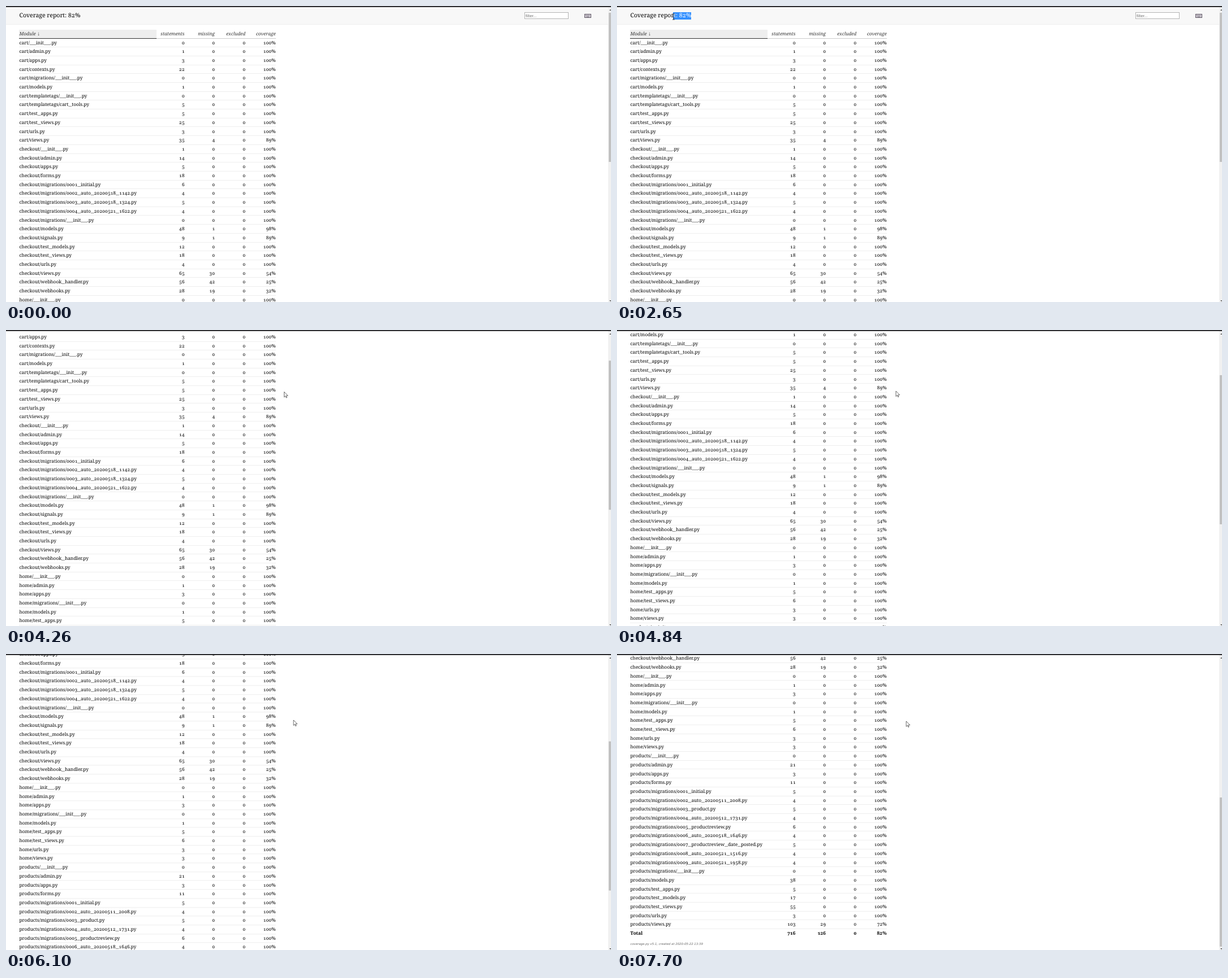
Recreate the animation shown at these times as an HTML page. Size 1069x524 px, loop 8000 ms.

```html
<!DOCTYPE html>
<html lang="en">
<head>
<meta charset="utf-8">
<title>Coverage report</title>
<style>
html, body { margin: 0; width: 100%; height: 100%; overflow: hidden; background: #fff; }
body { position: relative; color: #000; text-rendering: geometricPrecision; font: 8.33px "Noto Serif", serif; font-variant-numeric: oldstyle-nums tabular-nums; }
#page, #head, #title, #pick, #filter, #keys, #foot, #bar, #track, #thumb, #cursor, .row, .arrow { position: absolute; }
#page { left: 0; top: 0; width: 1064px; height: 1006px; }
#head { left: 0; top: 0; width: 1064px; height: 32px; background: #f8f8f8; border-bottom: 1px solid #eee; }
#title, #pick { left: 23.5px; top: 11px; height: 13px; font-size: 10.5px; line-height: 13px; white-space: pre; }
#pick { color: #fff; background: #3390ff; }
#filter { left: 916px; top: 11px; width: 76px; height: 10px; border: 1px solid #b4b4b4; background: #fff; font: 7.4px/11px "Liberation Sans", sans-serif; color: #757575; text-indent: 1px; }
#keys { left: 1022px; top: 14px; }
.row { left: 23px; width: 454px; height: 15.7px; line-height: 15.7px; box-sizing: border-box; border-bottom: 1px solid #eee; display: grid; grid-template-columns: 243px 49.5px 53.5px 54px 53.5px; white-space: pre; }
.row span { text-align: right; height: 15px; }
.row span:first-child { text-align: left; padding-left: .5px; }
.row i { font: 9.65px/0 "Liberation Mono", monospace; }
.row.hover { background: #eee; }
.row.hover span:first-child { text-decoration: underline; }
.row.top { top: 42px; height: 16px; font-style: italic; color: #333; border-bottom-color: #ccc; }
.row.top span:first-child { background: #eee; border-bottom: 1px solid #333; }
.row.total { font-weight: bold; border: 0; }
#foot { left: 23.5px; top: 990px; font: italic 5.4px/11px "DejaVu Sans", sans-serif; color: #666; white-space: pre; }
#bar { left: 0; top: 0; width: 100%; height: 2px; background: #2d2d30; }
#track { left: 1064px; top: 2px; width: 5px; height: 522px; background: #f1f1f1; }
#thumb { left: 1064.5px; top: 12px; width: 4.5px; height: 264px; background: #c1c1c1; }
.arrow { left: 1065.5px; border: 2px solid transparent; }
.up { top: 4px; border-bottom-color: #505050; }
.down { top: 521px; border-top-color: #505050; }
#cursor { left: 0; top: 0; overflow: visible; }
</style>
</head>
<body>
<div id="page">
  <div id="head">
    <div id="title">Coverage report: 82%</div>
    <div id="pick">Coverage report: 82%</div>
    <div id="filter">filter...</div>
    <svg id="keys" width="12" height="7"><rect x=".5" y=".5" width="11" height="6" fill="#d8d4dc" stroke="#5d5562"/><path d="M2 2.3H10M2 3.7H10" stroke="#6b6370" stroke-width=".8" stroke-dasharray="1 .6"/><path d="M3.5 5.1H8.5" stroke="#6b6370" stroke-width=".8"/></svg>
  </div>
  <div id="foot">coverage.py v5.1, created at 2020-05-22 13:39</div>
</div>
<div id="track"></div>
<div id="thumb"></div>
<div class="arrow up"></div>
<div class="arrow down"></div>
<div id="bar"></div>
<svg id="cursor" width="8" height="12">
  <path id="pointer" d="M0 0V17L4 13.2 6.6 19 9 18 6.5 12.2H12Z" transform="scale(.557)" fill="#fff" stroke="#222" stroke-width="1.2"/>
  <path id="beam" d="M-2 -5H2M0 -5V5M-2 5H2" fill="none" stroke="#333" stroke-width=".9"/>
</svg>
<script>
// name, statements, missing
const FILES = {
  cart: `__init__ 0,admin 1,apps 3,contexts 22,migrations/__init__ 0,models 1,templatetags/__init__ 0,
    templatetags/cart_tools 5,test_apps 5,test_views 25,urls 3,views 35 4`,
  checkout: `__init__ 1,admin 14,apps 5,forms 18,migrations/0001_initial 6,
    migrations/0002_auto_20200518_1142 4,migrations/0003_auto_20200518_1324 5,
    migrations/0004_auto_20200521_1622 4,migrations/__init__ 0,models 48 1,signals 9 1,test_models 12,
    test_views 18,urls 4,views 65 30,webhook_handler 56 42,webhooks 28 19`,
  home: `__init__ 0,admin 1,apps 3,migrations/__init__ 0,models 1,test_apps 5,test_views 6,urls 3,views 3`,
  products: `__init__ 0,admin 21,apps 3,forms 11,migrations/0001_initial 5,
    migrations/0002_auto_20200511_2008 4,migrations/0003_product 5,migrations/0004_auto_20200512_1731 4,
    migrations/0005_productreview 6,migrations/0006_auto_20200518_1646 4,
    migrations/0007_productreview_date_posted 5,migrations/0008_auto_20200521_1516 4,
    migrations/0009_auto_20200521_1958 4,migrations/__init__ 0,models 38,test_apps 5,test_models 17,
    test_views 55,urls 3,views 103 29`
};
const LOOP = 8000, ROW = 15.7, FIRST = 57.5, NOTCH = 55.68, MAX_SCROLL = 481;
const SELECT_END = 131;

// Screen updates come in bursts: start, end, number of updates
const BURSTS = [[230, 610, 7], [810, 1520, 12], [1640, 2350, 11], [2650, 3170, 9], [3370, 4140, 13], [4190, 4470, 5],
  [4770, 4960, 4], [5340, 5660, 6], [5840, 6620, 13], [6980, 7190, 4], [7490, 7700, 4]];
const WHEEL = [3810, 4159, 4740, 5277, 5810, 6062, 6400, 6952, 7460];
const PATH = [[230, 973, 507], [610, 420, 170], [810, 412, 168], [1520, 132, 19], [1640, 131, 18.5], [2000, 78, 18],
  [2350, 94, 20], [2650, 100, 19], [3170, 203, 37], [3370, 210, 40], [3760, 485, 108], [4260, 491.5, 109.5],
  [4960, 493, 108], [5460, 494, 108], [5840, 497, 109], [6100, 508, 117], [6620, 509.5, 118.5], [7700, 511, 119]];

// Updates fall on a 10 ms clock
const UPDATES = [0, ...BURSTS.flatMap(([from, to, n]) =>
  Array.from({ length: n }, (_, k) => from + 10 * Math.floor((to - from) * k / (n - 1) / 10)))];

const $ = id => document.getElementById(id);
const page = $("page"), rows = [];

function addRow(cells, cls, top) {
  const row = document.createElement("div");
  row.className = "row " + cls;
  if (top) row.style.top = top + "px";
  row.innerHTML = cells.map(c => `<span>${String(c).replace(/_+|↓/g, "<i>$&</i>")}</span>`).join("");
  return page.appendChild(row);
}
const percent = (all, missing) => (all ? Math.round(100 * (all - missing) / all) : 100) + "%";

addRow(["Module ↓", "statements", "missing", "excluded", "coverage"], "top");
for (const [app, list] of Object.entries(FILES))
  for (const item of list.split(",")) {
    const [name, all, missing = 0] = item.trim().split(" ");
    rows.push(addRow([`${app}/${name}.py`, all, missing, 0, percent(+all, +missing)], "", FIRST + ROW * rows.length));
  }
addRow(["Total", 716, 126, 0, percent(716, 126)], "total", FIRST + ROW * rows.length);

const ease = u => (u = Math.min(1, Math.max(0, u)), u * u * (3 - 2 * u));

const lastUpdate = t => Math.max(...UPDATES.filter(u => u <= t));

function scrollAt(t) {
  return Math.min(MAX_SCROLL, WHEEL.reduce((sum, start) => sum + NOTCH * ease((t - start) / 200), 0));
}
function cursorAt(t) {
  const i = PATH.findIndex(p => p[0] > t);
  if (i < 0) return PATH[PATH.length - 1].slice(1);
  if (i === 0) return [-50, -50];
  const [t0, x0, y0] = PATH[i - 1], [t1, x1, y1] = PATH[i], u = ease((t - t0) / (t1 - t0));
  return [x0 + (x1 - x0) * u, y0 + (y1 - y0) * u];
}

let hovered = null;
function draw(now) {
  const t = lastUpdate(now % LOOP), s = scrollAt(t), [x, y] = cursorAt(t);
  page.style.transform = `translateY(${-s}px)`;
  $("thumb").style.transform = `translateY(${s * .503}px)`;
  $("cursor").style.transform = `translate(${x}px,${y}px)`;

  const overTitle = s === 0 && x < SELECT_END + 4 && y > 9 && y < 26;
  $("beam").style.display = overTitle ? "" : "none";
  $("pointer").style.display = overTitle ? "none" : "";

  const selecting = t >= 1640 && t < 2700;
  $("pick").style.display = selecting ? "" : "none";
  $("pick").style.clipPath = `inset(0 0 0 ${Math.max(0, x - 1 - 23.5)}px)`;

  const row = x > 23 && x < 477 ? rows[Math.floor((y + s - FIRST) / ROW)] || null : null;
  if (row !== hovered) {
    if (hovered) hovered.classList.remove("hover");
    if (row) row.classList.add("hover");
    hovered = row;
  }
}
const begin = performance.now();
function tick() {
  draw(Math.max(0, performance.now() - begin));
  requestAnimationFrame(tick);
}
tick();
</script>
</body>
</html>
```
